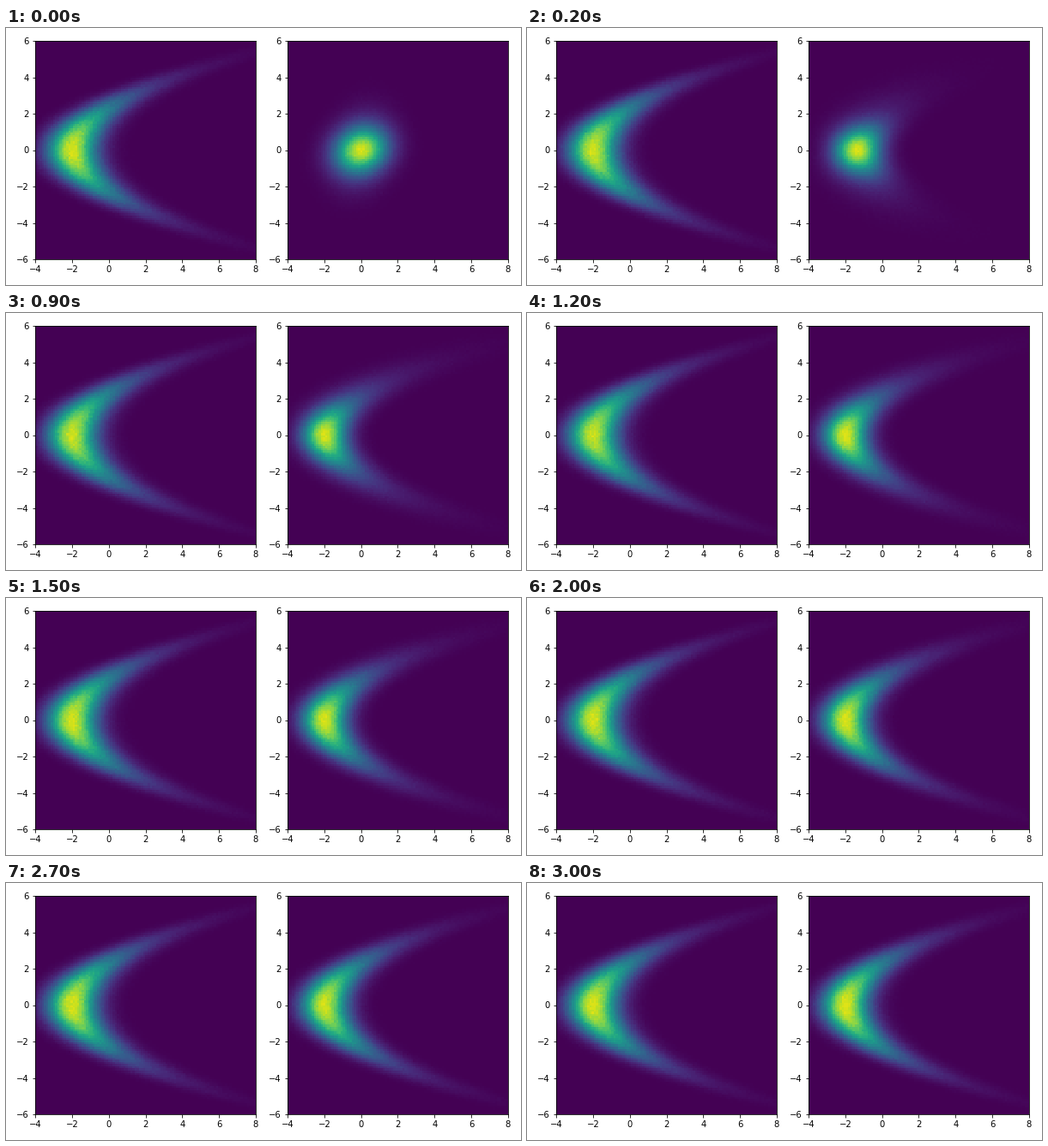
Recreate the animation shown at these times as a matplotlib script. Size 600x300 px, loop 3100 ms.

```python
import numpy as np
import matplotlib.pyplot as plt
from matplotlib.animation import FuncAnimation

FRAMES, INTERVAL = 31, 100
W, H, DPI = 600, 300, 72
BINS, SAMPLES = 100, 2_500_000
X_MIN, Y_MIN, SPAN = -4, -6, 12
CELL = SPAN / BINS
HEADROOM = 1.05

centers = (np.arange(BINS) + 0.5) * CELL
X, Y = np.meshgrid(X_MIN + centers, Y_MIN + centers)


def normal(v, mean, sd):
    return np.exp(-0.5 * ((v - mean) / sd) ** 2) / (sd * np.sqrt(2 * np.pi))


def target_density():
    return normal(Y, 0, 1.88) * normal(X, Y**2 / 3 - 2, 0.94)


def flow_density(i):
    """Round blob that bends quickly, then slowly tightens into the crescent."""
    fresh = np.exp(-i / 1.8)
    learned = 1 - fresh
    blur = 0.5 * learned * np.exp(-i / np.where(Y > 0, 9, 6.5))

    core = 0.7 * np.exp(-i / 13)
    core_sd = 0.85 + 0.025 * i
    tail_sd = 1.35 + 0.55 * learned + 0.5 * learned * np.exp(-i / 8)
    marginal = core * normal(Y, 0, core_sd) + (1 - core) * normal(Y, 0, tail_sd)

    ridge = learned * (Y**2 / 3 - 2) + 0.15 * fresh * Y
    width = (0.8 + 0.2 * fresh + 0.003 * i) * np.sqrt(1 + blur * Y**2)
    return marginal * normal(X, ridge, width)


def add_panel(left):
    # 257 x 255 pixel panel, 15 pixels below the top edge
    ax = fig.add_axes((left / W, 30 / H, 257 / W, 255 / H))
    extent = (X_MIN, X_MIN + SPAN, Y_MIN, Y_MIN + SPAN)
    image = ax.imshow(np.zeros((BINS, BINS)), extent=extent, origin="lower",
                      cmap="viridis", aspect="auto", interpolation="nearest")
    ax.set_xticks(range(-4, 9, 2))
    ax.set_yticks(range(-6, 7, 2))
    return image


def update(i):
    rng = np.random.default_rng(i)
    for image, density in zip(images, (target_density(), flow_density(i))):
        counts = rng.poisson(density * CELL**2 * SAMPLES)
        image.set_data(counts)
        image.set_clim(0, HEADROOM * counts.max())
    return images


fig = plt.figure(figsize=(W / DPI, H / DPI), dpi=DPI)
images = [add_panel(left) for left in (34, 328)]

anim = FuncAnimation(fig, update, frames=FRAMES, interval=INTERVAL,
                     init_func=lambda: update(0), repeat=True, repeat_delay=0)
plt.show()
```
